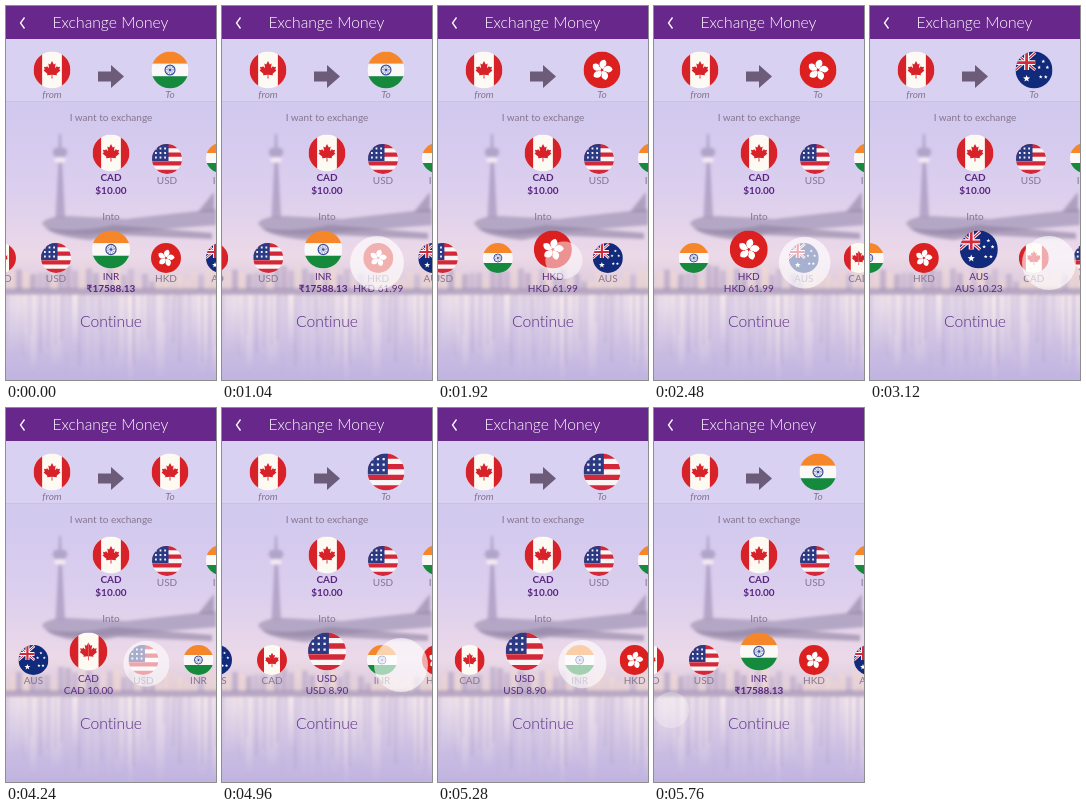
Write an HTML page that moves like this. It is 210 px wide and 374 px high and loops after 5840 ms.

```html
<!DOCTYPE html>
<html lang="en">
<head>
<meta charset="utf-8">
<title>Exchange Money</title>
<style>
  html, body { margin: 0; width: 100%; height: 100%; overflow: hidden; background: #d3c6e6; }
  svg { display: block; width: 100vw; height: 100vh; }
  text { font: 10px Lato, "Open Sans", sans-serif; font-variant-ligatures: none; text-anchor: middle; fill: #85768f; }
  .on { fill: #5a2a80; }
  .bold { font-weight: 700; fill: #5a2580; }
  .it { font-style: italic; }
  .big { font-size: 15.7px; font-weight: 300; }
</style>
</head>
<body>
<svg viewBox="0 0 210 374" preserveAspectRatio="none">
  <defs>
    <linearGradient id="sky" x2="0" y2="1">
      <stop offset="0" stop-color="#d2c9ef"/>
      <stop offset=".3" stop-color="#d2c9ee"/>
      <stop offset=".5" stop-color="#dccfee"/>
      <stop offset=".67" stop-color="#ecd9e8"/>
      <stop offset=".75" stop-color="#dccbdc"/>
      <stop offset=".8" stop-color="#d9cde6"/>
      <stop offset="1" stop-color="#c0b3e0"/>
    </linearGradient>
    <linearGradient id="ray" x2="0" y2="1">
      <stop offset="0" stop-color="#fdf0ee"/>
      <stop offset="1" stop-color="#fdf0ee" stop-opacity="0"/>
    </linearGradient>
    <filter id="soft" x="-20%" y="-20%" width="140%" height="140%"><feGaussianBlur stdDeviation="1.8"/></filter>
    <clipPath id="disc"><circle r="15"/></clipPath>
    <path id="half" d="M0-9 1.8-5.6 3.7-6.5 2.9-1.8 5.2-4 5.8-2.8 8.2-3.2 7.4-.5 8.6.4 4.7 3.8 5 5.2.4 4.7.5 8.6H0Z"/>
    <path id="petal" fill="#fff" d="M0-.8C-4-2.5-4-7.5.4-8.6 3-7 3-4 1.3-3.2 1.7-2 .8-1.3 0-.8Z"/>
    <path id="star" fill="#fff" d="M0-2 .5-.7 1.9-.6.8.3 1.2 1.6 0 .9-1.2 1.6-.8.3-1.9-.6-.5-.7Z"/>
    <g id="CAD">
      <path fill="#fdfaf3" d="M-15-15h30v30h-30z"/>
      <path fill="#d8222a" d="M-15-15h7v30h-7zM8-15h7v30h-7z"/>
      <g fill="#d8222a" transform="scale(.8)"><use href="#half"/><use href="#half" transform="scale(-1 1)"/></g>
    </g>
    <g id="USD">
      <path fill="#fbf4f4" d="M-15-15h30v30h-30z"/>
      <path stroke="#d3283a" stroke-width="4.3" d="M-15-12.900h30M-15-4.300h30M-15 4.300h30M-15 12.900h30"/>
      <path fill="#2b3a83" d="M-15-15H1.500V2H-15z"/>
      <path stroke="#f0f0fa" stroke-width="1.8" stroke-dasharray="1.8 2.8" d="M-12-10.500H0M-12-6H0M-12-1.500H0"/>
    </g>
    <g id="INR">
      <path fill="#f6862a" d="M-15-15h30v10h-30z"/>
      <path fill="#fbf9f8" d="M-15-5h30V5h-30z"/>
      <path fill="#168a3c" d="M-15 5h30v10h-30z"/>
      <circle r="4" fill="none" stroke="#3a4c9c"/>
      <circle r="2" fill="none" stroke="#8490c4" stroke-width="3" stroke-dasharray=".4 .65"/>
      <circle r="1" fill="#3a4c9c"/>
    </g>
    <g id="HKD"><path fill="#dc2020" d="M-15-15h30v30h-30z"/></g>
    <g id="AUS">
      <path fill="#122a7c" d="M-15-15h30v30h-30z"/>
      <path stroke="#fff" stroke-width="2.400" d="M-15-14 1 0M1-14-15 0"/>
      <path stroke="#d3293c" d="M-15-14 1 0M1-14-15 0"/>
      <path stroke="#fff" stroke-width="4" d="M-6-15V0M-15-6H1"/>
      <path stroke="#d3293c" stroke-width="2.200" d="M-6-15V0M-15-6H1"/>
    </g>
  </defs>

  <rect width="210" height="374" fill="url(#sky)"/>
  <g filter="url(#soft)">
    <g id="city"></g>
    <path fill="#9d8fb6" opacity=".65" d="M53 128h2l.5 14h4l2 5-3 4H49.500l-3-4 2-5h4zM52.500 156h3.500l3 56H49.500z"/>
    <ellipse cx="54" cy="154" rx="6" ry="2.500" fill="#f6ecf2"/>
    <path fill="#a598b8" opacity=".75" d="M36 217Q42 210 62 210L120 213 210 203V219L150 224 80 229Q40 228 36 217Z"/>
    <path fill="#8d7f9f" opacity=".6" d="M40 222Q70 227 108 219L206 227V233L112 229 84 234Q46 230 40 222ZM192 206l16-20v20z"/>
    <path fill="#9586aa" opacity=".5" d="M-5 282h220v7H-5z"/>
    <g id="water"></g>
  </g>
  <rect y="33" width="210" height="62" fill="#e4dcf5" opacity=".4"/>
  <path stroke="#c5b6d2" stroke-width=".8" opacity=".5" d="M0 95.500H210"/>

  <rect width="210" height="33" fill="#68278a"/>
  <path d="M18.500 11.500 14.500 17l4 5.500" fill="none" stroke="#fff" stroke-width="1.300"/>
  <text class="big" x="104.500" y="22" style="fill:#fff">Exchange Money</text>

  <path fill="#6c5c7a" d="M92 65.500h13V59l13 11.500L105 82v-6.500H92z"/>
  <text class="it" x="46" y="92">from</text>
  <text class="it" x="164" y="92">To</text>
  <text x="105" y="115">I want to exchange</text>
  <text class="bold" x="105" y="175">CAD</text>
  <text class="bold" x="105" y="188">$10.00</text>
  <text x="161" y="178">USD</text>
  <text x="215" y="178">INR</text>
  <text x="105" y="214">Into</text>
  <text class="on big" x="105" y="321">Continue</text>
  <g id="fixed"></g>
  <g id="strip"></g>
  <circle id="touch" fill="#fff"/>
</svg>
<script>
const $ = id => document.getElementById(id);
function add(parent, tag, attrs = {}, text = '') {
  const el = document.createElementNS('http://www.w3.org/2000/svg', tag);
  set(el, attrs);
  el.textContent = text;
  parent.append(el);
  return el;
}
function set(el, attrs) {
  for (const k in attrs) el.setAttribute(k, attrs[k]);
}
function place(el, x, y, r) {
  set(el, { transform: `translate(${x} ${y}) scale(${r / 15})` });
}
function flag(parent, code, x = 0, y = 0, r = 15) {
  const g = add(parent, 'g', { 'clip-path': 'url(#disc)' });
  place(g, x, y, r);
  return { g, use: add(g, 'use', { href: '#' + code }) };
}
const clamp = v => Math.min(1, Math.max(0, v));

// Flag details
for (let i = 0; i < 5; i++) {
  add($('HKD'), 'use', { href: '#petal', transform: `rotate(${i * 72 + 12})` });
  const a = i * 1.257;
  add($('AUS'), 'use', { href: '#star', transform: `translate(${7.5 + 3.5 * Math.sin(a)} ${-7 * Math.cos(a)}) scale(.8)` });
}
add($('AUS'), 'use', { href: '#star', transform: 'translate(-6 7) scale(1.5)' });

// Blurred skyline and its reflection
let seed = 7;
const rand = () => (seed = seed * 16807 % 2147483647) / 2147483647;
for (let x = -4; x < 214; x += 7) {
  const h = 8 + rand() * 18;
  add($('city'), 'rect', { x, y: 284 - h, width: 6, height: h, fill: rand() < .5 ? '#b09fc0' : '#f3d9cc', opacity: .3 + rand() * .3 });
  add($('water'), 'rect', { x, y: 289, width: 3 + rand() * 6, height: 45 + rand() * 45, fill: 'url(#ray)', opacity: .2 + rand() * .6 });
  add($('water'), 'rect', { x: x + rand() * 7, y: 290, width: 2, height: 25 + rand() * 50, fill: '#a898c4', opacity: rand() * .4 });
}

flag($('fixed'), 'CAD', 46, 64, 18.5);
flag($('fixed'), 'CAD', 105, 147, 18.5);
flag($('fixed'), 'USD', 161, 153);
flag($('fixed'), 'INR', 215, 152);
const dest = flag($('fixed'), 'INR', 164, 64, 18.5);

const GAP = 55, LOOP = 5840, STEP = 80, FIRST = 2;
const codes = ['CAD', 'USD', 'INR', 'HKD', 'AUS'];
const prices = ['CAD 10.00', 'USD 8.90', '₹17588.13', 'HKD 61.99', 'AUS 10.23'];

// Each swipe moves the strip by one flag; the choice flips near its end
const swipes = [[960, 1170], [2320, 860], [3200, 700], [3920, 780], [5040, 720]]
  .map(([press, span]) => ({ press, span, flip: press + span * .82 }));

// Finger: lands, drags left, lets go; in from below, out at the left
const finger = [
  { t: 720, x: 176, y: 395, r: 18, o: 0 },
  ...swipes.flatMap(({ press, span }) => [
    { t: press - 80, x: 179, y: 257, r: 27, o: .62 },
    { t: press + 80, x: 155, y: 257, r: 27, o: .65 },
    { t: press + span * .8, x: 122, y: 254, r: 18, o: .5 }
  ]),
  { t: 5760, x: 17, y: 302, r: 18, o: .28 }
];

const items = Array.from({ length: 10 }, (_, i) => {
  const code = codes[i % 5], g = add($('strip'), 'g');
  return {
    g,
    flag: flag(g, code).g,
    label: add(g, 'text', {}, code),
    price: add(g, 'text', { y: 285.5, class: code === 'INR' ? 'bold' : 'on' }, prices[i % 5])
  };
});

function fingerAt(t) {
  const n = finger.findIndex(p => p.t > t);
  if (n < 1) return finger.at(n);
  const a = finger[n - 1], b = finger[n], k = (t - a.t) / (b.t - a.t);
  const mix = key => a[key] + (b[key] - a[key]) * k;
  return { x: mix('x'), y: mix('y'), r: mix('r'), o: mix('o') };
}

// How far the n-th choice has come in (0 to 1)
function arrived(n, t) {
  if (n < 1) return n < 0 ? 0 : 1;
  return n > swipes.length ? 0 : clamp((t - swipes[n - 1].flip) / 160 + 1);
}

function draw(time) {
  const t = Math.floor(time % LOOP / STEP) * STEP;
  const shift = GAP * swipes.reduce((sum, s) => sum + clamp((t - s.press) / s.span), 0);
  const chosen = swipes.filter(s => t >= s.flip).length;
  set(dest.use, { href: '#' + codes[(FIRST + chosen) % 5] });

  items.forEach((item, i) => {
    const n = i - FIRST;
    const k = n < 0 ? 0 : arrived(n, t) - arrived(n + 1, t);
    const peek = n === 1 && chosen === 0 && t > swipes[0].press;
    set(item.g, { transform: `translate(${105 + n * GAP - shift} 0)` });
    place(item.flag, 0, 252 - 8.5 * k, 15 + 4 * k);
    set(item.label, { y: 276 - 2.5 * k, class: k > .5 ? 'on' : '', opacity: n === 0 ? k : 1 });
    set(item.price, { opacity: peek ? 1 : k });
  });

  const f = fingerAt(t);
  set($('touch'), { cx: f.x, cy: f.y, r: f.r, opacity: f.o });
}

const start = performance.now();
function tick() {
  draw(performance.now() - start);
  requestAnimationFrame(tick);
}
tick();
</script>
</body>
</html>
```
